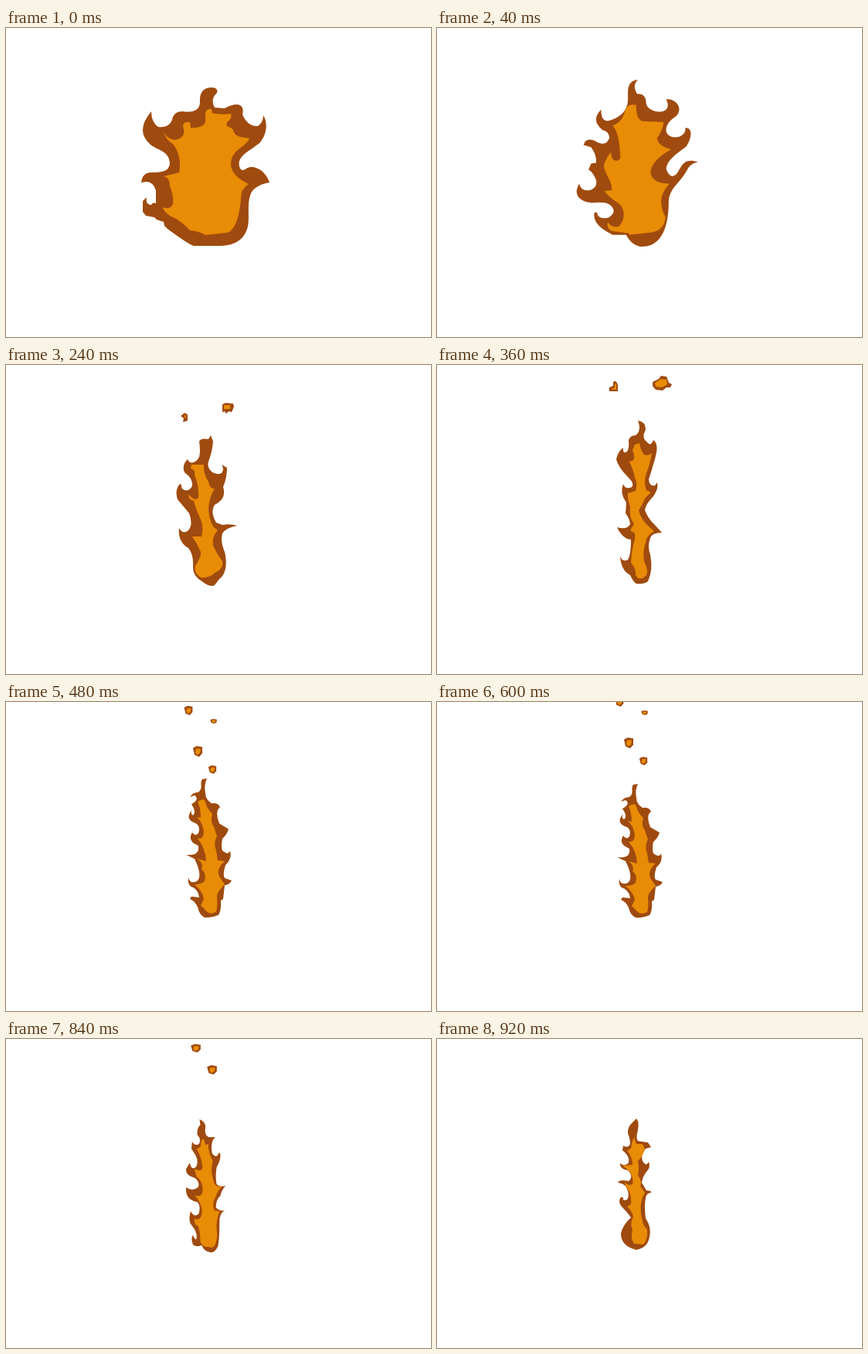
An HTML page without scripts that plays this animation: 550x400 px, repeating every 960 ms.

```html
<!DOCTYPE html>
<html lang="en">
<head>
<meta charset="utf-8">
<title>Flame</title>
<style>
  html, body { margin: 0; width: 100%; height: 100%; overflow: hidden; background: #fff; }
  svg { display: block; width: 100%; height: 100%; }
  path { fill: #9f4a0f; }
  .core { fill: #e88b05; }

  /* Each pose is cut in at --at and held for one, two or three 40 ms ticks. */
  .pose { opacity: 0; animation: one 960ms step-end var(--at) infinite; }
  .two { animation-name: two; }
  .three { animation-name: three; }
  @keyframes one { 0% { opacity: 1 } 4.166%, 100% { opacity: 0 } }
  @keyframes two { 0% { opacity: 1 } 8.333%, 100% { opacity: 0 } }
  @keyframes three { 0% { opacity: 1 } 12.499%, 100% { opacity: 0 } }

  .pose > use { transform-origin: 262px 282px; }
  .pose > .bit { transform-origin: 0 0; }
</style>
</head>
<body>
<svg viewBox="0 0 550 400">
  <defs>
    <g id="burst">
      <path d="M251 97C250 84 255 77 266 77Q275 77 273 84Q264 92 270 103L283 104Q291 99 300 99Q309 101 306 112Q313 128 326 127Q333 122 333 113C339 122 338 138 328 149C314 160 299 166 302 179Q304 187 311 182C320 176 336 184 341 200C328 202 318 208 316 217C311 232 317 250 311 263C305 277 292 282 275 282H243Q236 280 209 260L205 256 204 251 195 248 192 245 181 243 177 238V224L182 219Q180 229 188 229Q190 225 194 227V210Q190 199 182 199L175 200C176 192 180 187 188 187C204 187 211 185 212 175C211 158 194 158 186 150Q167 133 188 108Q188 122 197 128Q213 130 216 115Q220 107 229 108C243 110 250 106 251 97Z"/>
      <path class="core" d="M258 110Q260 104 266 105L267 110Q278 113 291 111C294 120 283 120 286 127Q292 129 294 132C296 142 306 141 315 143Q312 150 302 156Q290 165 291 178Q293 192 314 202Q304 208 304 220C303 238 298 262 286 265L258 268Q250 263 238 262Q230 253 220 247Q207 242 202 232Q212 236 216 228Q217 215 212 205Q212 193 204 192L224 187C227 175 224 160 216 150Q206 144 204 134Q207 142 217 145C228 144 233 138 229 127Q229 121 238 122L239 129Q256 130 258 121Z"/>
    </g>

    <g id="blaze">
      <path d="M260 58Q253 66 259 77Q270 76 270 90C272 104 304 108 294 84C308 84 314 98 306 107Q295 115 294 124C292 139 318 140 317 123C325 122 326 135 318 148C306 158 295 166 294 178Q298 191 304 187C311 184 311 160 332 169Q322 171 318 182C309 199 296 206 297 226C296 272 280 283 265 283Q253 282 246 267H230Q205 254 208 237H211Q212 247 225 244Q236 236 227 227Q222 222 205 224C192 223 181 214 190 198Q191 208 202 207Q212 204 210 193Q206 182 201 179L204 171 210 170Q211 160 204 149L195 146Q197 136 208 140Q222 150 226 136Q225 127 218 126Q203 113 216 98Q216 118 229 112Q246 105 248 88C249 75 245 60 260 58Z"/>
      <path class="core" d="M246 96Q250 90 258 92Q258 112 266 114L291 115Q290 126 283 137Q285 148 300 152C286 160 273 174 276 186Q280 198 298 198Q288 210 288 222Q288 232 293 243C293 255 286 263 275 264L250 267 249 265 229 262Q222 258 224 250Q228 258 237 256C245 248 246 230 235 223Q226 217 220 208L229 207C229 190 215 180 221 168Q225 158 228 156Q228 168 235 167Q240 166 239 160C238 140 236 128 230 120Q240 115 243 106Z"/>
    </g>

    <g id="lean">
      <path d="M265 91L268 99Q267 112 262 125C259 135 270 144 279 140Q283 135 279 129L286 133Q286 146 281 158Q286 173 270 181Q264 190 272 204L280 207Q290 205 299 208Q284 211 280 218Q277 228 283 242C287 258 284 272 276 277L270 285Q264 288 255 281Q242 274 242 262Q243 245 236 237Q222 229 224 211Q228 219 235 215Q243 208 237 192Q228 181 222 174Q218 162 225 154L227 155C226 164 238 165 241 156Q242 147 231 139Q227 130 235 122C238 130 247 126 250 119Q252 112 250 99Q252 94 262 96Z"/>
      <path class="core" d="M240 129H256Q255 140 262 151Q264 161 270 160C260 176 260 194 268 209L274 214Q266 222 268 234Q273 245 280 254Q282 264 270 269Q264 276 252 275Q243 270 245 260Q253 248 252 242Q248 232 241 222H253Q256 210 252 200Q246 188 243 176Q236 175 236 167Q244 177 249 172Q250 155 244 143Q246 136 239 134Z"/>
    </g>

    <g id="twist">
      <path d="M260 72Q270 73 270 84Q264 94 272 100Q277 106 280 97Q287 102 283 118Q278 136 274 148Q275 158 282 156L285 152Q287 160 280 170Q270 180 269 188Q274 200 281 206L291 217Q278 217 276 224Q272 234 276 246Q280 265 273 280Q268 284 258 283Q254 281 250 272Q238 266 237 247Q240 256 247 252Q251 246 251 226Q240 225 233 210Q246 214 250 206Q249 198 244 192L245 178Q236 166 241 154Q244 162 252 158Q256 154 248 146Q234 132 232 122Q234 112 241 107Q240 116 246 112Q249 108 248 97Q250 91 257 91Q265 85 260 72Z"/>
      <path class="core" d="M256 103L262 101Q264 112 268 116Q274 118 278 114Q276 128 271 140Q267 152 271 162L277 165Q268 172 266 180L261 188Q264 200 274 209L281 215Q270 222 270 230Q266 240 268 254Q274 266 271 272Q262 281 257 272Q258 264 251 256Q252 238 256 226V218L250 214 255 206Q248 196 250 184Q246 172 247 166L257 163Q260 152 256 146Q254 134 248 124Q252 126 255 122Q256 118 253 110Z"/>
    </g>

    <g id="ragged">
      <path d="M260 106Q256 114 258 124Q258 132 266 137Q275 136 277 142Q270 146 276 162L288 169Q286 176 280 181Q278 190 280 196Q288 202 290 196Q293 206 284 214Q280 226 283 230L292 233Q290 238 283 239L281 256 278 258Q279 270 275 276Q264 280 257 279Q250 276 248 266Q244 258 238 256L240 253 250 254Q249 246 243 242Q234 240 236 229Q238 238 247 234Q255 228 244 206L233 201Q251 203 249 190L242 186Q236 180 241 173Q245 179 249 174Q252 166 246 162Q230 157 241 145Q238 150 242 152Q247 148 240 138Q251 132 244 127L238 129Q242 123 249 123C256 118 250 112 254 107Z"/>
      <path class="core" d="M248 135Q254 131 257 133Q260 144 267 150Q264 160 269 166L273 178Q268 186 272 196L274 208 283 209Q272 218 276 228L283 238Q274 246 273 252Q274 266 272 272Q264 276 260 272L252 264 256 256Q254 246 244 238Q253 238 257 234Q260 224 253 219Q256 212 248 206L259 209Q258 192 248 181Q256 182 256 172Q254 160 247 154L252 155Q252 144 248 135Z"/>
    </g>

    <g id="sway">
      <path d="M250 104Q258 107 258 114Q256 124 262 127H271Q264 134 267 148Q273 156 276 147L278 149Q279 156 273 166Q271 178 273 188Q277 192 285 190Q280 195 278 203Q272 208 272 218Q276 223 284 222Q278 225 277 233Q277 256 275 268Q270 278 264 276Q256 275 253 267Q245 270 241 266Q238 258 241 254Q245 262 246 258Q247 250 240 242Q234 236 238 223Q243 232 249 226Q252 216 247 211Q230 208 232 192Q240 198 248 192Q251 186 244 180Q230 176 232 168L237 160Q238 170 245 166Q250 158 243 148L239 142 240 133Q244 139 249 136Q253 130 247 124Q246 116 251 111Z"/>
      <path class="core" d="M252 134Q253 128 256 130L258 137 262 136Q261 146 268 158Q264 170 269 184Q270 192 280 191Q273 198 272 204Q266 212 270 222L277 223Q272 236 273 246Q275 258 271 266Q268 272 262 269Q254 270 251 262Q251 250 248 242Q242 240 243 232Q248 236 252 230Q256 220 248 208L243 202Q252 206 254 198Q256 186 246 178L243 168Q250 172 254 168Q254 156 246 142Q252 142 252 134Z"/>
    </g>

    <g id="calm">
      <path d="M258 103Q262 107 260 118Q257 128 260 132L273 134 277 140 270 142Q263 150 266 158Q271 166 274 159Q277 166 271 172Q266 178 265 186L271 196 277 197V199Q271 199 270 206Q268 216 270 232Q278 244 275 256Q273 270 258 273Q238 268 238 252Q240 241 251 231Q246 224 240 218Q234 212 237 206Q240 203 241 206Q240 210 246 208Q250 202 245 192Q242 187 234 186Q236 181 248 184Q255 178 247 170Q236 168 237 161Q244 166 248 160Q250 152 240 144L241 138Q247 142 250 136Q250 130 247 122Q246 114 254 107Z"/>
      <path class="core" d="M252 135L255 127 258 136H266L269 143Q266 152 260 158Q262 168 260 176Q266 186 263 190L269 199Q262 210 264 226L267 240 272 247Q273 260 267 266L255 265Q250 258 253 246Q249 240 254 230Q252 222 246 217L251 214Q252 204 248 196L244 190 243 184Q246 191 253 188Q256 174 240 164L253 163Q254 156 246 144Q252 144 252 135Z"/>
    </g>

    <g id="ember">
      <path d="M-6-4L-1-6 6-5 6 2 2 6-4 4Z"/>
      <path class="core" d="M-2-3L4-3 3 2-1 4-3 1Z"/>
    </g>
    <g id="crumbs">
      <path d="M280 51L284 49 294 50 295 54 292 61 288 60 285 63 283 60 280 61Z"/>
      <path class="core" d="M282 52L290 52 290 57 282 57Z"/>
      <path d="M226 66L231 62 235 64 235 72 229 74 230 69Z"/>
      <path class="core" d="M231 65H233V68H231Z"/>
    </g>
    <g id="clots">
      <path d="M279 22L287 18 290 14 297 15 300 23 304 25 302 29 297 29 292 33 283 32 279 27Z"/>
      <path class="core" d="M282 23L290 18 297 19 298 25 291 29 283 28Z"/>
      <path d="M223 34V29L228 27V22Q232 19 234 26V34Z"/>
      <path class="core" d="M225 32L230 29V24L232 25V32Z"/>
    </g>
    <g id="trail">
      <use href="#ember" transform="translate(236 0) scale(.9 1)"/>
      <use href="#ember" transform="translate(268.500 14) scale(.7 .5)"/>
      <use href="#ember" transform="translate(248 53) scale(1 1.150)"/>
      <use href="#ember" transform="translate(267 76.500) scale(.85 .9)"/>
    </g>
    <g id="pair">
      <use href="#ember" transform="translate(269 0) scale(.5 .7)"/>
      <use href="#ember" transform="translate(245.500 29) scale(1.050 .9)"/>
      <use href="#ember" transform="translate(266.500 57) scale(1.050 1)"/>
    </g>
  </defs>

  <g class="pose" style="--at:0ms"><use href="#burst"/></g>
  <g class="pose two" style="--at:40ms"><use href="#blaze" style="scale:1.08 .96"/></g>
  <g class="pose" style="--at:120ms"><use href="#blaze"/></g>
  <g class="pose two" style="--at:160ms"><use href="#blaze" style="scale:.76 .98"/></g>
  <g class="pose" style="--at:240ms"><use href="#lean"/><use href="#crumbs"/></g>
  <g class="pose two" style="--at:280ms">
    <use href="#lean" style="scale:.85 1.05"/><use class="bit" href="#crumbs" y="-17"/>
  </g>
  <g class="pose" style="--at:360ms"><use href="#twist"/><use href="#clots"/></g>
  <g class="pose two" style="--at:400ms">
    <use href="#twist" style="scale:.97 .95"/><use class="bit" href="#clots" y="-18"/>
  </g>
  <g class="pose three" style="--at:480ms">
    <use href="#ragged" style="scale:1 1.04"/><use class="bit" href="#trail" y="11"/>
  </g>
  <g class="pose two" style="--at:600ms"><use href="#ragged"/><use href="#trail"/></g>
  <g class="pose two" style="--at:680ms">
    <use href="#sway" style="scale:1.04 1.01"/><use class="bit" href="#pair" y="11"/>
  </g>
  <g class="pose" style="--at:760ms"><use href="#sway"/><use href="#pair"/></g>
  <g class="pose two" style="--at:800ms">
    <use href="#sway" style="scale:.96 1"/><use class="bit" href="#pair" y="-17"/>
  </g>
  <g class="pose" style="--at:880ms">
    <use href="#calm" style="scale:1.04 1.01"/><use class="bit" href="#pair" y="-40"/>
  </g>
  <g class="pose" style="--at:920ms"><use href="#calm"/></g>
</svg>
</body>
</html>
```
